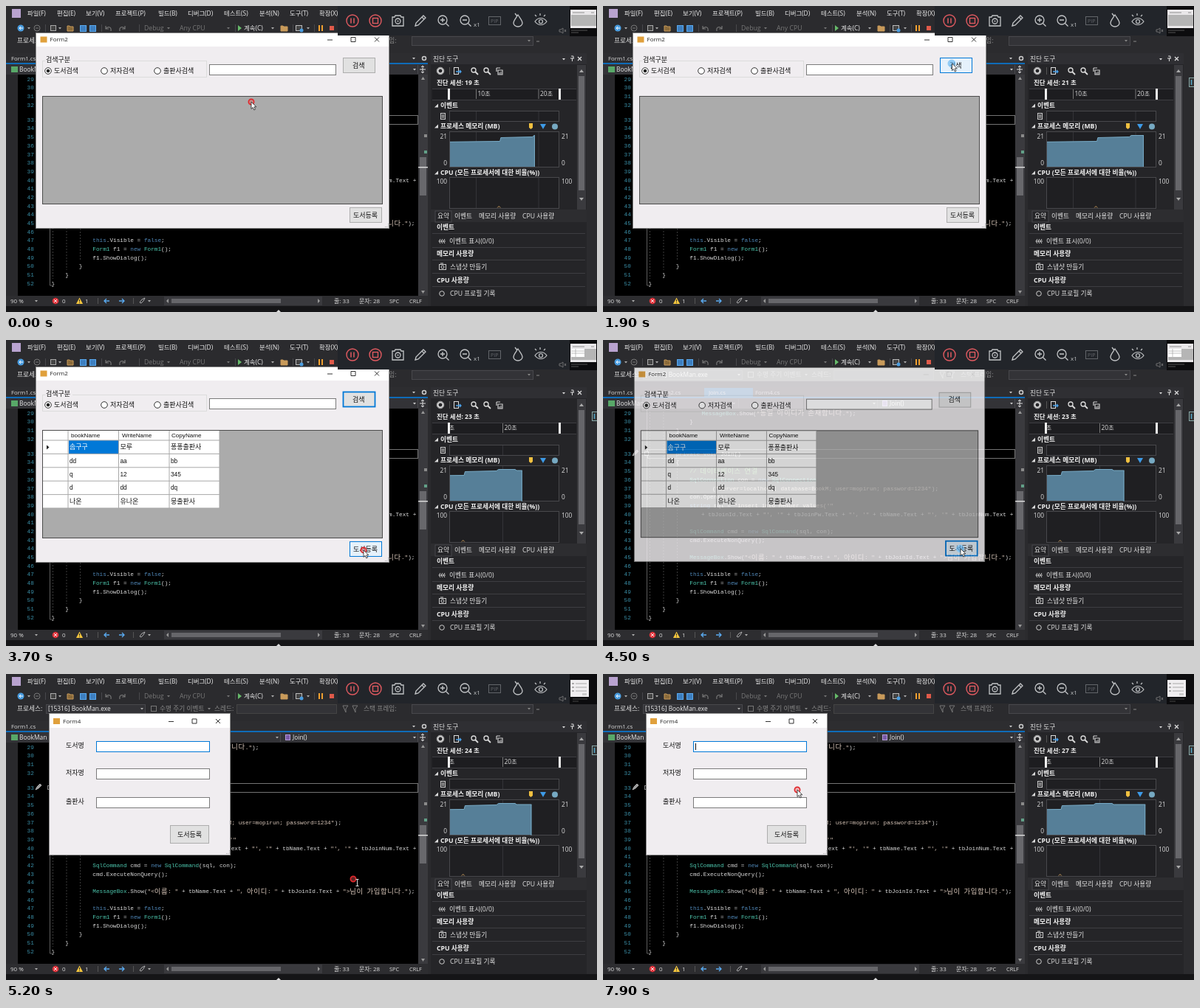
These frames come from a looping animation (800 px wide and 415 px high, 8 s). An HTML page:

```html
<!DOCTYPE html>
<html lang="ko">
<head>
<meta charset="utf-8">
<title>Form demo</title>
<style>
  html, body { margin: 0; width: 100%; height: 100%; overflow: hidden; background: #000; }
  svg { display: block; width: 100%; height: 100%; }
  text { white-space: pre; }
  .ui { font-family: 'Open Sans', 'Noto Sans CJK KR', 'Noto Sans CJK', sans-serif; }
  .form { font-family: 'Liberation Sans', 'Noto Sans CJK KR', 'Noto Sans CJK', sans-serif; }
  .mono { font-family: 'Liberation Mono', monospace; }
  .ko { font-family: 'Noto Sans CJK KR', 'Noto Sans CJK', sans-serif; }
</style>
</head>
<body>
<svg id="stage" viewBox="0 0 800 415" preserveAspectRatio="none"></svg>
<script>
const esc = s => s.replace(/&/g, '&amp;').replace(/</g, '&lt;');
const rect = (x, y, w, h, fill, stroke, extra = '') =>
  `<rect x="${x}" y="${y}" width="${w}" height="${h}" fill="${fill}" ${stroke ? `stroke="${stroke}"` : ''} ${extra}/>`;
const box = (x1, y1, x2, y2, fill, stroke, extra) =>
  rect(x1 + .5, y1 + .5, x2 - x1 - 1, y2 - y1 - 1, fill, stroke, extra);
const path = (d, stroke, w = 1, fill = 'none') =>
  `<path d="${d}" stroke="${stroke}" stroke-width="${w}" fill="${fill}"/>`;
const circle = (x, y, r, fill, stroke = 'none', w = 1) =>
  `<circle cx="${x}" cy="${y}" r="${r}" fill="${fill}" stroke="${stroke}" stroke-width="${w}"/>`;
// y is the vertical middle of the line
const text = (x, y, s, fill = '#e4e4e4', size = 8.7, cls = 'ui', extra = '') =>
  `<text x="${x}" y="${y + size * .36}" font-size="${size}" fill="${fill}" class="${cls}" ${extra}>${esc(s)}</text>`;
const bold = (x, y, s) => text(x, y, s, '#f0f0f0', 8.7, 'ui', 'font-weight="700"');
const chevron = (x, y, c = '#b0b0b0') => path(`M${x - 2} ${y - 1}h4l-2 2.5z`, 'none', 0, c);
const group = (id, body) => `<g id="${id}">${body}</g>`;

// ---- code editor ----
const CH = 4.64, ROW = 11.68;
const rowY = n => n < 33 ? 99 + (n - 29) * ROW : 154 + (n - 33) * ROW;
const KEYWORDS = /^(this|false|new|private|void|string)$/;
const TYPES = /^(SqlCommand|SqlConnection|MessageBox|Form1)$/;
const tint = s => s[0] === '"' ? '#d9c7ba' : s.startsWith('//') ? '#57a64a'
  : KEYWORDS.test(s) ? '#4f87b8' : TYPES.test(s) ? '#4ec9b0' : '#dcdcdc';

function codeLine(row, col, src) {
  let out = '';
  for (const token of src.match(/"[^"]*"|\/\/.*|\w+|[^\w"]+/g))
    for (const run of token.match(/[가-힣]+|[^가-힣]+/g)) {
      const ko = /[가-힣]/.test(run);
      const x = 61.6 + col * CH;
      out += ko
        ? [...run].map((c, i) => text(x + i * 2 * CH, rowY(row), c, tint(token), 9.4, 'ko')).join('')
        : text(x, rowY(row), run, tint(token), CH / .6, 'mono');
      col += run.length * (ko ? 2 : 1);
    }
  return out;
}

const LINES = [
  [29, 15.5, 'MessageBox.Show("동일 아이디가 존재합니다.");'],
  [30, 12, '}'], [31, 8, '}'],
  [33, 8, 'private void Join()'], [34, 8, '{'],
  [35, 12, '// 데이터베이스 연결'],
  [36, 12, 'SqlConnection con = new SqlConnection'],
  [37, 18.6, '("server=localhost; database=BookM; user=mopirun; password=1234");'],
  [38, 12, 'con.Open();'],
  [39, 12, 'string sql = "insert into Member values(\'"'],
  [40, 15.4, '+ tbJoinId.Text + "\', \'" + tbJoinPw.Text + "\', \'" + tbName.Text + "\', \'" + tbJoinNum.Text +'],
  [42, 12, 'SqlCommand cmd = new SqlCommand(sql, con);'],
  [43, 12, 'cmd.ExecuteNonQuery();'],
  [45, 12, 'MessageBox.Show("<이름: " + tbName.Text + ", 아이디: " + tbJoinId.Text + ">님이 가입합니다.");'],
  [47, 12, 'this.Visible = false;'],
  [48, 12, 'Form1 f1 = new Form1();'],
  [49, 12, 'f1.ShowDialog();'],
  [50, 8, '}'], [51, 4, '}'], [52, 0, '}']
];

function editor() {
  let s = rect(0, 93, 558, 300, '#000') + rect(0, 93, 16, 300, '#29292c');
  for (let n = 29; n <= 52; n++) s += text(28.5, rowY(n), String(n), '#3a8fa8', CH / .6, 'mono');
  s += '<g stroke-dasharray="2 2">' + path('M63.5 93V370M82 93V358M100.5 162V346', '#4a4a4a', .8) + '</g>';
  s += path('M59.5 93V379H63M59.5 357', '#777', .8);
  s += box(60, 148, 558, 161, 'none', '#747474');
  s += box(56, 151, 62, 157, '#000', '#888');
  s += path('M40 157l2-4 4-4 2 2-4 4z', '#ccc', .8, '#999');
  s += LINES.map(l => codeLine(...l)).join('');
  // vertical scroll bar
  s += rect(558, 93, 13, 300, '#3a3a3e') + rect(560, 205, 9, 52, '#68686c');
  s += path('M562 100l2.5-4 2.5 4z', 'none', 0, '#999') + path('M562 386l2.5 4 2.5-4z', 'none', 0, '#999');
  s += rect(566, 174, 4, 4, '#8a8a8a') + rect(566, 196, 4, 4, '#62a088') + rect(558, 218, 13, 1.5, '#d8d8d8');
  // status strip
  s += rect(0, 393, 571, 14, '#2d2d30') + text(6, 400, '90 %', '#ddd', 8) + chevron(41, 400);
  s += circle(67, 400, 4.3, '#e0343c') + path('M65 398l4 4m0-4l-4 4', '#fff', 1) + text(76, 400, '0', '#ddd', 8);
  s += path('M95 404l4.500-8.500 4.500 8.500z', 'none', 0, '#f5c73d') + path('M99.500 398v3m0 1v1', '#333', 1) + text(107, 400, '1', '#ddd', 8);
  s += path('M140 400h-7m3-3l-3 3 3 3M153 400h7m-3-3l3 3-3 3', '#5aaaf0', 1.3);
  s += path('M124.500 396v8M172.500 396v8', '#555') + path('M181 402l3-4 4-2-2 4-3 3z', '#ccc', .8) + chevron(194, 400);
  s += rect(214, 394, 214, 12, '#3a3a3e') + rect(224, 397, 148, 6, '#66666a');
  s += path('M220 397v6l-3-3z', 'none', 0, '#999') + path('M422 397v6l3-3z', 'none', 0, '#999');
  s += text(444, 400, '줄: 33', '#ddd', 8) + text(478, 400, '문자: 28', '#ddd', 8)
    + text(519, 400, 'SPC', '#ddd', 7.4) + text(546, 400, 'CRLF', '#ddd', 7.4);
  return s;
}

function shell() {
  let s = rect(0, 0, 800, 415, '#2b2b2e') + rect(8, 4, 12, 12, '#b9a3d0');
  const menu = [[29, '파일(F)'], [69, '편집(E)'], [108, '보기(V)'], [148, '프로젝트(P)'], [206, '빌드(B)'],
    [246, '디버그(D)'], [295, '테스트(S)'], [343, '분석(N)'], [384, '도구(T)'], [424, '확장(X)']];
  s += menu.map(([x, t]) => text(x, 10, t, '#eee', 8.4)).join('');
  // tool bar
  s += circle(20, 30, 4.500, '#4a9de0') + path('M23 30h-5m2-2l-2 2 2 2', '#fff', 1) + chevron(31, 30);
  s += circle(42, 30, 4, 'none', '#777') + path('M40 30h4', '#777') + path('M53.500 25v10M129.500 25v10M180.500 25v10M310.500 25v10M388.500 25v10M417.500 25v10', '#48484c');
  s += box(60, 26, 68, 34, '#444', '#aaa') + chevron(73, 30) + path('M83 34v-7h3l1 1h4v6z', '#c89a5a', 1, '#8a6a3a');
  s += box(100, 26, 109, 35, '#3d7fc0', '#5aaaf0') + box(113, 26, 122, 35, '#3d7fc0', '#5aaaf0');
  s += path('M135 27v4h4m-4 0c3-4 8-3 7 3M161 27v4h-4m4 0c-3-4-8-3-7 3', '#777', 1.2);
  s += text(187, 30, 'Debug', '#777') + chevron(220, 30, '#777') + text(235, 30, 'Any CPU', '#777') + chevron(301, 30, '#777');
  s += path('M314 26v8l5-4z', 'none', 0, '#66bb6a') + text(322, 30, '계속(C)', '#eee', 8.4) + chevron(361, 30);
  s += path('M372 34v-7h3l1 1h5v6z', '#c89a5a', 1, '#c89a5a') + box(392, 26, 401, 34, '#444', '#bbb') + circle(400, 33, 2.500, '#4a9de0') + chevron(409, 30);
  s += rect(423, 26, 2, 8, '#f0a030') + rect(427, 26, 2, 8, '#f0a030') + rect(438, 27, 6, 6, '#e05a4a');
  // process bar
  s += text(15, 47, '프로세스:') + box(54, 41, 189, 54, '#333337', '#48484c') + text(57, 47, '[15316] BookMan.exe', '#eee', 8.4) + chevron(184, 47);
  s += box(196, 43, 204, 51, 'none', '#777') + text(208, 47, '수명 주기 이벤트', '#888') + chevron(275, 47, '#888') + text(282, 47, '스레드:', '#888');
  s += box(312, 41, 448, 54, '#333337', '#444') + path('M456 43h7l-3 4v5z', '#777') + path('M469 43h7l-3 4v5z', '#777');
  s += text(484, 47, '스택 프레임:', '#888') + box(549, 41, 714, 54, '#333337', '#48484c') + chevron(708, 47, '#888') + path('M718 48h4', '#888');
  // tabs
  s += rect(0, 64, 571, 14, '#2d2d30') + rect(137, 65, 66, 13, '#0f6cb8') + rect(0, 77, 571, 2, '#0f6cb8');
  s += text(7, 71, 'Form1.cs', '#ddd', 7.8) + text(72, 71, 'Form2.cs', '#ddd', 7.8) + text(143, 71, 'Join.cs', '#fff', 7.8) + text(206, 71, 'Form4.cs', '#ddd', 7.8);
  s += chevron(552, 71, '#ccc') + circle(566, 71, 2.500, 'none', '#ccc', 1.500);
  s += rect(0, 79, 571, 14, '#333337') + path('M183.500 80v12M371.500 80v12M557.500 80v12', '#4a4a4e');
  s += rect(7, 82, 9, 8, '#58a868') + text(18, 86, 'BookMan', '#eee', 8.4) + chevron(177, 86) + chevron(367, 86);
  s += box(378, 82, 385, 90, '#7a5aa8', '#b39ad8') + text(388, 86, 'Join()', '#eee', 8.4) + chevron(553, 86, '#ccc');
  s += path('M560 86h8M564 81v10M562 83l2-2 2 2M562 89l2 2 2-2', '#ddd');
  return s + editor();
}

function diagnostics() {
  let s = rect(575, 64, 211, 343, '#252528') + rect(575, 64, 211, 15, '#2f2f33') + text(578, 72, '진단 도구');
  s += chevron(755, 72, '#ddd') + path('M764 71h5m-4-3h3v3m-1.500 0v4', '#ddd') + path('M774 69l5 5m0-5l-5 5', '#ddd', 1.2);
  s += circle(588, 88, 3.300, 'none', '#ddd', 1.600) + circle(588, 88, 4.800, 'none', '#ddd', .8) + path('M600.500 83v10', '#555');
  s += box(606, 83, 613, 93, 'none', '#ddd') + path('M609 89h7m-2-2l2 2-2 2', '#4aa0e8', 1.300);
  s += [634, 651].map(x => circle(x - 1, 87, 3, 'none', '#ddd', 1.3) + path(`M${x + 1} 89l4 4`, '#ddd', 1.800)).join('');
  s += path('M664 84h5m-5 0v5M666 87h6v6h-6z', '#ccc', 1.2) + path('M668 93v-3m2 3v-4', '#ccc');
  s += '<text id="session" x="583" y="107" font-size="8.5" font-weight="700" fill="#f0f0f0" class="ui"></text>';
  s += rect(577, 112, 195, 15, '#1d1d20') + path('M577 112.500h195M577 127.500h195', '#3e3e42');
  const head = (y, t) => path(`M585 ${y - 2.500}v5h-5z`, 'none', 0, '#ddd') + bold(588, y, t);
  s += head(135, '이벤트') + box(600, 142, 749, 157, '#1f1f22', '#48484c') + box(588, 145, 595, 154, 'none', '#ccc') + path('M590.500 147v5M592.500 147v5', '#ccc');
  s += head(163, '프로세스 메모리 (MB)') + path('M708 159h5v6l-2.500 2-2.500-2z', 'none', 0, '#f0c040');
  s += path('M723 160h8l-4 7z', 'none', 0, '#3d9be8') + circle(743, 163.500, 4, '#76a9c2');
  s += box(600, 170, 749, 219, '#1f1f22', '#48484c') + box(600, 232, 749, 275, '#1f1f22', '#48484c');
  const scale = (y, t) => text(597, y, t, '#ddd', 8.4, 'ui', 'text-anchor="end"') + text(752, y, t, '#ddd', 8.4);
  s += scale(177, '21') + scale(213, '0') + head(226, 'CPU (모든 프로세서에 대한 비율(%))') + scale(238, '100');
  s += charts();
  s += rect(598, 112, 3, 15, '#f0f0f0') + rect(748, 112, 3, 15, '#f0f0f0');
  s += rect(773, 80, 12, 196, '#3a3a3e') + rect(775, 95, 8, 155, '#66666a');
  s += path('M776 90l3-4 3 4z', 'none', 0, '#aaa') + path('M776 260l3 4 3-4z', 'none', 0, '#aaa');
  s += rect(575, 276, 211, 17, '#2d2d30') + rect(581, 278, 22, 15, '#252528', '#48484c');
  s += text(584, 285, '요약') + text(607, 285, '이벤트') + text(640, 285, '메모리 사용량') + text(699, 285, 'CPU 사용량');
  const part = (y, t) => path(`M577 ${y + 8.500}h207`, '#3e3e42') + bold(583, y, t);
  s += part(300, '이벤트') + text(600, 319, '이벤트 표시(0/0)') + path('M586 319l2-3M586 319l2 3M589 319l2-3M589 319l2 3M592 319l2-3M592 319l2 3M586 319h9', '#ccc');
  s += path('M577 327.500h207M577 362.500h207', '#3e3e42') + part(336, '메모리 사용량') + text(601, 354, '스냅샷 만들기');
  s += box(586, 350, 596, 358, 'none', '#ccc') + circle(591, 354, 2, 'none', '#ccc') + path('M588 349h4', '#ccc');
  s += part(372, 'CPU 사용량') + text(601, 390, 'CPU 프로필 기록') + circle(590, 390, 3.300, 'none', '#ccc');
  s += rect(786, 64, 14, 343, '#2b2b2e') + group('dock', box(793, 97, 801, 110, '#333', '#8aa') + path('M796.500 100v7', '#5ac', 1.500));
  s += rect(0, 407, 800, 8, '#151517') + path('M366 415l3-3 3 3z', 'none', 0, '#ddd');
  return s;
}

// ---- charts: x in seconds, 20 s at x = 721 before the axis shifts ----
const SEC = 8.45, secX = s => 721 + (s - 20) * SEC;
const LEVEL = [[4, 184.5], [13.8, 183.5], [13.95, 178.5], [19, 177.5], [19.3, 175.5], [22, 175.5], [22.2, 177], [40, 177]];

function charts() {
  const line = LEVEL.map(([s, y]) => `${secX(s)} ${y}`).join('L');
  const ticks = [10, 20].map(s => path(`M${secX(s)} 113v13`, '#777') + text(secX(s) + 2, 118.500, s + '초', '#ddd', 8.4)
    + path(`M${secX(s)} 143v13M${secX(s)} 171v47M${secX(s)} 233v41`, '#343438')).join('');
  return `<clipPath id="frame"><rect x="601" y="110" width="147" height="165"/></clipPath>
    <clipPath id="past"><rect id="pastRect" x="601" y="170" width="1" height="104"/></clipPath>
    <g clip-path="url(#frame)"><g class="axis">${ticks}</g></g>
    <g clip-path="url(#past)"><g class="axis">
      ${path(`M${line}V218H${secX(4)}z`, 'none', 0, '#567f98')}${path('M' + line, '#78abc6')}
      ${path(`M${secX(13.4)} 273.500l2-2 2 2`, '#c89a5a')}
    </g></g><rect id="edge" y="176" width="1" height="42" fill="#78abc6"/>`;
}

// ---- forms ----
const button = (id, x1, y1, x2, y2, label, tx) =>
  `<g>${box(x1, y1, x2, y2, '#e1e1e1', '#adadad', `id="${id}"`)}${text(tx, (y1 + y2) / 2, label, '#111', 9, 'form')}</g>`;
const caption = (title, x, y, bx) => rect(x - 5, y - 4, 9, 8, '#e0a03c') + text(x + 8, y, title, '#222', 8)
  + `<g class="caption">${path(`M${bx} ${y + .5}h7M${bx + 32} ${y - 3}h6v6h-6zM${bx + 64} ${y - 3}l6 6m0-6l-6 6`, '#333')}</g>`;
const grip = (x, y) => [0, 2, 4].map(i => rect(x - i, y, 1, 1, '#aaa') + rect(x, y - i, 1, 1, '#aaa')).join('');
const label = (x, y, s) => text(x, y, s, '#111', 9, 'form');

const ROWS = [['솜구구', '모루', '퐁퐁출판사'], ['dd', 'aa', 'bb'], ['q', '12', '345'], ['d', 'dd', 'dq'], ['나온', '유나온', '뭉출판사']];

function table() {
  const xs = [84, 152.500, 221, 289], y0 = 136, h = 18.4;
  let s = rect(50, 123, 239, 105, '#fff') + rect(85, y0, 67, h, '#0078d7');
  s += path([...xs].map(x => `M${x}.0 123V228`.replace('.5.0', '.5')).join(''), '#a8a8a8');
  for (let i = 0; i <= 5; i++) s += path(`M50 ${y0 + i * h}H289`, '#a8a8a8');
  ['bookName', 'WriteName', 'CopyName'].forEach((t, i) => s += text([88, 157, 224][i], 129, t, '#111', 8.1, 'form'));
  ROWS.forEach((r, j) => r.forEach((t, i) =>
    s += text(xs[i] + 2, y0 + (j + .5) * h, t, i + j ? '#111' : '#fff', /[가-힣]/.test(t) ? 9 : 8.3, 'form')));
  return s + path('M55 142.500v6l3.500-3z', 'none', 0, '#222');
}

function form2() {
  const client = '#f0edf0';
  let s = box(40, 36, 519, 302, client, '#8c8c8c') + rect(41, 37, 477, 18, '#fff') + caption('Form2', 51.500, 45.500, 435);
  s += box(49, 74, 272, 97, 'none', '#dcdcdc') + rect(53, 68, 37, 10, client) + label(54, 73, '검색구분');
  [[57, '도서검색'], [133, '저자검색'], [205, '출판사검색']].forEach(([x, t], i) =>
    s += circle(x, 88, 4.3, '#fff', '#333') + (i ? '' : circle(x, 88, 2.3, '#222')) + label(x + 8, 88, t));
  s += box(275, 79, 447, 94, '#fff', '#7a7a7a') + button('find', 456, 70, 500, 91, '검색', 469);
  s += box(49, 122, 510, 269, '#ababab', '#4c4c4c') + group('table', table());
  return s + button('add', 465, 273, 509, 294, '도서등록', 470) + grip(517, 299);
}

function form4() {
  let s = box(58, 53, 304, 246, '#f0edf0', '#8c8c8c') + rect(59, 54, 244, 19, '#fff') + caption('Form4', 69, 64, 220);
  [['도서명', 97, 92], ['저자명', 134, 129], ['출판사', 173, 168]].forEach(([t, y, top], i) =>
    s += label(81, y, t) + box(122, top - 1, 276, top + 14, '#fff', i ? '#7a7a7a' : '#0078d7'));
  s += '<rect id="caret" x="125" y="94" width="1" height="9" fill="#111"/>';
  return s + button('save', 222, 205, 275, 230, '도서등록', 232) + grip(302, 243);
}

// ---- screen recorder ----
function recorder() {
  const c = '#c4c6c8', red = '#e05a60';
  let s = rect(449, 0, 314, 40, '#22252a') + rect(763, 0, 37, 41, '#0c0c0e');
  s += circle(469, 20, 8, 'none', red, 1.4) + path('M467 16.500v7M471 16.500v7', red, 1.500);
  s += circle(500, 20, 8, 'none', red, 1.4) + box(496, 16, 504, 24, 'none', red, 'stroke-width="1.4"');
  s += path('M523 15h3l1-2h7l1 2h3v12h-15z', c, 1.3) + circle(530.500, 20.500, 3.500, 'none', c, 1.3) + circle(530.500, 20.500, 1, c);
  s += path('M554 27l1-4 10-10 3 3-10 10zM563 15l3 3', c, 1.3);
  [591, 621].forEach((x, i) => s += circle(x, 19, 6, 'none', c, 1.3) + path(`M${x + 4.500} 23.500l4 4M${x - 3} 19h6` + (i ? '' : `M${x} 16v6`), c, 1.3));
  s += text(633, 25, 'x1', c, 8) + box(653, 14, 670, 26, 'none', '#63666a') + text(656, 20, 'PIP', '#63666a', 7);
  s += path('M693 12c-4 6-6 8-6 11a6 5 0 0 0 12 0c0-3-2-5-6-11zM689 10l3 4', c, 1.3);
  s += path('M716 21c4-6 12-6 16 0-4 6-12 6-16 0zM718 14l-2-2M723 13v-3M728 14l2-2', c, 1.2) + circle(724, 21, 2.500, 'none', c, 1.2);
  s += path('M749 32h2l3-2v7l-3-2h-2zM756 32l2 3m0-3l-2 3', '#777', .9);
  s += group('mini2', rect(764, 5, 35, 25, '#e9e7e9') + rect(765, 12, 34, 15, '#b5b5b5') + path('M767 9h16M792 9h4', '#777', .8)
    + group('miniTable', rect(765, 12, 18, 11, '#fff') + path('M765 15h18M765 18h18M771 12v11', '#999', .6)) + path('M765 33h22M765 36h10', '#666', .8));
  s += group('mini4', rect(764, 8, 25, 23, '#f0eef0') + path('M771 13h15M771 18h15M771 23h15', '#999', .8) + path('M766 13h3M766 18h3M766 23h3', '#444', .8)
    + rect(780, 26, 6, 3, '#ccc') + path('M767 34h20M767 37h8', '#555', .8));
  return s;
}

const pointer = group('pointer',
  group('ring', circle(0, 0, 3.6, 'rgba(240,90,90,.4)', '#e0282c', 1.7)) +
  group('press', circle(-.5, 0, 5, 'rgba(90,180,245,.6)', '#8fcbf5')) +
  group('arrow', path('M0 0v9.500l2.200-2 1.600 3.500 1.700-.8-1.600-3.400h3z', '#222', .8, '#fff')) +
  group('beam', path('M3.500.5h4M5.500.5v9M3.500 9.500h4', '#ddd')));

const stage = document.getElementById('stage');
stage.innerHTML = shell() + diagnostics() + group('form2', form2()) + group('form4', form4()) + recorder() + pointer;

// ---- motion ----
const $ = id => document.getElementById(id);
const show = (id, on) => $(id).setAttribute('visibility', on ? 'visible' : 'hidden');
const set = (id, attrs) => { for (const k in attrs) $(id).setAttribute(k, attrs[k]); };
const clamp = v => Math.max(0, Math.min(1, v));
const PATH = [[300, 332, 130], [1500, 472.5, 78], [2800, 472.5, 78], [3600, 484, 285],
  [4500, 484, 283], [4700, 470, 278], [5200, 470, 278], [6000, 263, 157]];

function pointerAt(t) {
  let [, x, y] = PATH[0];
  for (let i = 1; i < PATH.length; i++) {
    const [t0] = PATH[i - 1], [t1, x1, y1] = PATH[i];
    const k = clamp((t - t0) / (t1 - t0)), e = k * k * (3 - 2 * k);
    x += (x1 - x) * e;
    y += (y1 - y) * e;
  }
  return [x, y];
}

function paintButton(id, hover, focus) {
  set(id, { fill: hover ? '#e5f1fb' : '#e1e1e1', stroke: hover || focus ? '#0078d7' : '#adadad', 'stroke-width': focus ? 1.8 : 1 });
}

function render(t) {
  const sec = 19.4 + t / 1000;
  const shift = t >= 3100 ? -48.5 : 0;
  const [x, y] = pointerAt(t);
  const inside = (x1, y1, x2, y2) => x >= x1 && x <= x2 && y >= y1 && y <= y2;

  $('session').textContent = `진단 세션: ${Math.floor(sec)} 초`;
  document.querySelectorAll('.axis').forEach(g => g.setAttribute('transform', `translate(${shift})`));
  const edge = secX(sec) + shift;
  set('pastRect', { width: edge - 601 });
  set('edge', { x: edge - 1, y: sec > 22 ? 177 : 176 });
  show('dock', t >= 1100);

  const out = t < 4500 ? 1 : t < 4600 ? .83 : t < 4700 ? .25 : 0;
  const scale = out === 1 ? 1 : out > .5 ? .992 : .975;
  set('form2', { opacity: out, transform: `translate(279.5 169) scale(${scale}) translate(-279.5 -169)` });
  $('form2').querySelector('.caption').setAttribute('opacity', out < 1 ? .1 : 1);
  set('form4', { opacity: t < 4600 ? 0 : t < 4700 ? .4 : t < 4800 ? .9 : 1 });
  show('table', t >= 2300);
  show('miniTable', t >= 2300 && t < 4600);
  show('mini2', t < 4600);
  show('mini4', t >= 4600);
  show('caret', t >= 4600 && Math.floor((t - 4600) / 530) % 2 === 0);
  paintButton('find', inside(456, 70, 500, 91), t >= 2000 && t < 4300);
  paintButton('add', inside(465, 273, 509, 294), t >= 4300);

  const beam = t >= 4600 && !inside(58, 53, 304, 246) && inside(60, 93, 557, 393);
  const press = (t >= 1800 && t < 2100) || (t >= 4300 && t < 4600);
  set('pointer', { transform: `translate(${x} ${y})` });
  show('beam', beam);
  show('arrow', !beam);
  show('press', press);
  show('ring', !press);
}

function tick(now) {
  render(Math.floor(now % 8000 / 100) * 100);
  requestAnimationFrame(tick);
}
render(0);
requestAnimationFrame(tick);
</script>
</body>
</html>
```
